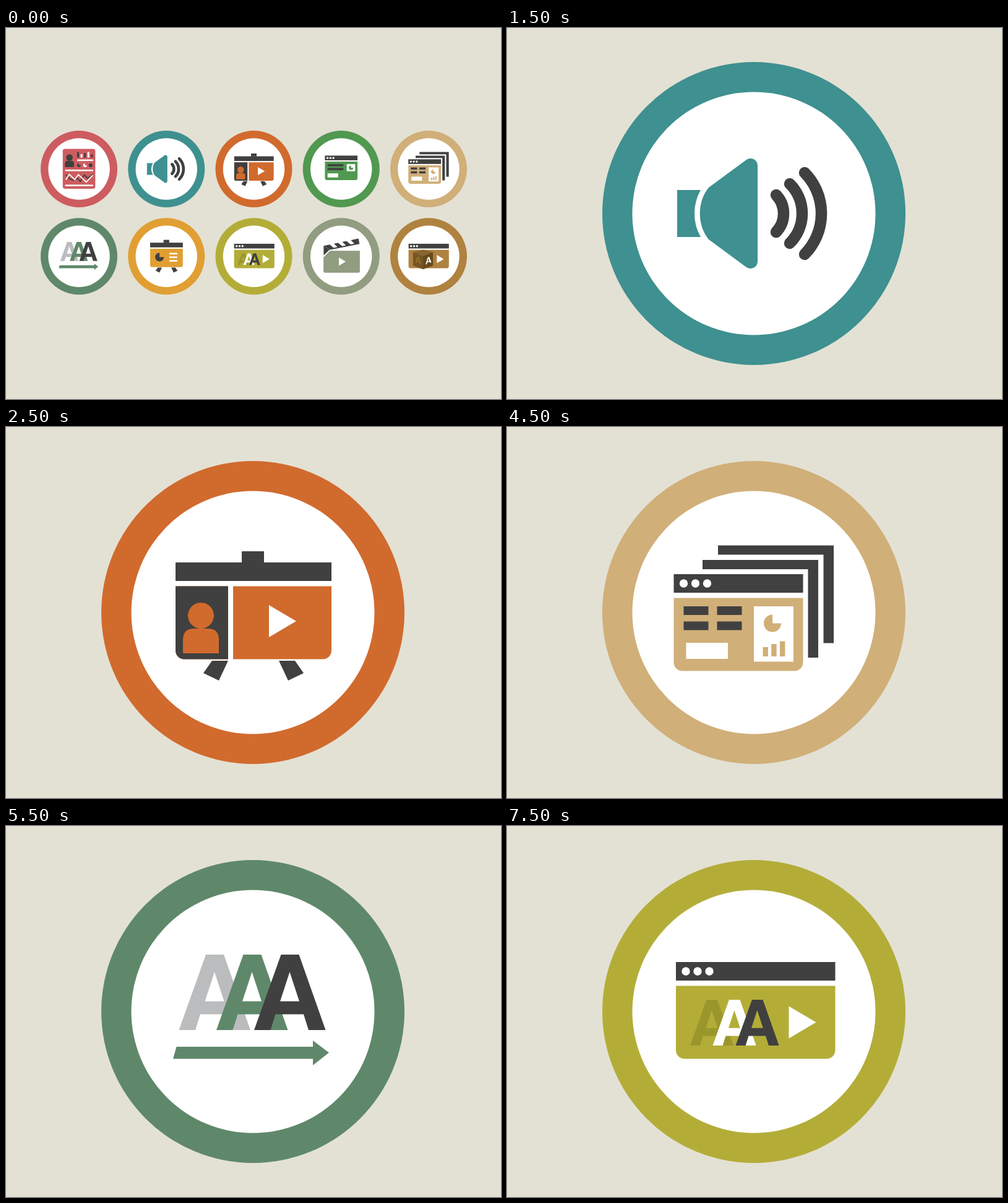
Recreate the animation shown at these times as an HTML page. Size 800 px wide and 600 px high, loop 8000 ms.

```html
<!DOCTYPE html>
<html lang="en">
<head>
<meta charset="utf-8">
<title>Icon set</title>
<style>
  html, body { margin: 0; width: 100%; height: 100%; overflow: hidden; background: #e3e1d4; }
  svg { display: block; }
</style>
</head>
<body>
<svg id="stage" width="800" height="600" viewBox="0 0 800 600"></svg>
<script>
const DARK = '#404040', WHITE = '#fff';

// Shapes without a fill inherit the icon's main colour.
const fillAttr = fill => fill ? ` fill="${fill}"` : '';
const path = (d, fill) => `<path d="${d}"${fillAttr(fill)}/>`;
const box = (x, y, w, h, fill) => `<rect x="${x}" y="${y}" width="${w}" height="${h}"${fillAttr(fill)}/>`;
const dot = (x, y, r, fill) => `<circle cx="${x}" cy="${y}" r="${r}"${fillAttr(fill)}/>`;
const line = (d, width, color, cap = 'butt') =>
  `<path d="${d}" fill="none" stroke="${color}" stroke-width="${width}" stroke-linecap="${cap}"/>`;

const pie = (x, y, r, fill) => path(`M${x} ${y}V${y - r}A${r} ${r} 0 1 0 ${x + r} ${y}Z`, fill);
const play = (x, y) => path(`M${x} ${y}l44 26l-44 26Z`, WHITE);
const person = (x, y, fill) => dot(x, y, 21, fill) +
  path(`M${x - 29} ${y + 61}v-22q0-18 18-18h22q18 0 18 18v22Z`, fill);
const letter = (x, y, scale, fill) =>
  `<path transform="translate(${x} ${y}) scale(${scale})" fill="${fill}" fill-rule="evenodd" d="${LETTER_A}"/>`;
const LETTER_A = 'M0 122L43.5 0H72.5L115.5 122H88L80 96.5H34.5L26.5 122ZM57.5 28L42 75.5H73Z';

const panel = (x, y, w) => box(x, y, w, 30, DARK) +
  path(`M${x} ${y + 38.5}h${w}v104a14 14 0 0 1-14 14h${28 - w}a14 14 0 0 1-14-14Z`);
const browser = (x, y, w) => panel(x, y, w) +
  [16, 35, 54].map(dx => dot(x + dx, y + 15, 6.7, WHITE)).join('');
const easel = (x, y, w, legs) => panel(x, y, w) + box(-18, y - 18, 36, 19, DARK) +
  path(`M${-legs} ${y + 159}h26l-15 32l-25-12ZM${legs + 2} ${y + 159}h-26l15 32l25-12Z`, DARK);

const frameEdge = (x, y) => path(`M${x} ${y}h187v158h-16.5v-143H${x}Z`, DARK);
const miniBars = [36, 22, 28, 36, 20].map((h, i) =>
  box(-12 + 22 * i, -73 - h, 12, h, i % 2 ? WHITE : DARK)).join('');

// Each icon: ring colour, horizontal centre when enlarged, artwork around (0, 0).
const icons = [
  ['#cd5c60', 400,
    '<rect x="-104" y="-128" width="208" height="254" rx="14"/>' +
    person(-61, -73, DARK) + miniBars + box(-12, -61, 103, 10, WHITE) +
    pie(0, -24, 12, DARK) + pie(38, -24, 12, WHITE) + dot(74, -24, 12, DARK) +
    box(-88, 4, 178, 10, WHITE) + box(-88, 100, 178, 10, WHITE) +
    line('M-84 38L-60 62L-36 72L-12 58L8 80L34 38L56 60L88 34', 7, DARK) +
    line('M-84 68L-62 34L-28 68L-4 36L46 84L88 40', 7, WHITE)],

  ['#3f9090', 399,
    path('M-124-38H-86A77 77 0 0 0-86 38H-124Z') +
    path('M-73-42L-12-87C-4-92 6-87 6-77V77C6 87-4 92-12 87L-73 42C-92 19-92-19-73-42Z') +
    line('M36-30A43.5 43.5 0 0 1 36 30M58-48A67.6 67.6 0 0 1 58 48M82-66A94 94 0 0 1 82 66',
      18.5, DARK, 'round')],

  ['#d16a2d', 399,
    easel(-125, -81, 252, 66) +
    path('M-125-42.5h85v118h-71a14 14 0 0 1-14-14Z', DARK) + box(-40, -43, 8, 120, WHITE) +
    person(-84, 5) + play(26, -12)],

  ['#519850', 400,
    browser(-104, -85.5, 208) +
    box(-87, -31, 101, 14, DARK) + box(-87, -6.5, 101, 14, DARK) +
    box(-87, 28, 67.5, 26, WHITE) + box(35.5, -31, 53.5, 45.5, WHITE) + pie(62.5, -8, 14)],

  ['#d0af79', 399,
    frameEdge(-58, -108.5) + frameEdge(-83, -85) + browser(-129.5, -62, 209) +
    [-113.5, -59.5].map(x => box(x, -10, 40, 14, DARK) + box(x, 14.5, 40, 14, DARK)).join('') +
    box(-109.5, 49, 67.5, 26, WHITE) + box(0, -10, 64, 89.5, WHITE) + pie(30, 17.5, 14) +
    [15, 20, 24.5].map((h, i) => box(14.5 + 13.7 * i, 71 - h, 8.5, h)).join('')],

  ['#5f886a', 399,
    letter(-119.5, -92, 1, '#bbbcbe') + letter(-59, -92, 1, '#5f886a') + letter(2, -92, 1, DARK) +
    path('M-123.5 57H97V47L123 66.5L97 87V76.5H-129Z')],

  ['#e19f33', 400,
    easel(-104, -87, 209, 55) + pie(-44, 5, 28, DARK) +
    [-22, 1, 24].map(y => box(19, y, 51, 10, WHITE)).join('')],

  ['#b3ad38', 399,
    browser(-126, -80, 257.5) +
    letter(-103, -19, 0.607, '#9b962c') + letter(-66.5, -19, 0.607, WHITE) +
    letter(-29.5, -19, 0.607, DARK) + play(56.5, -8.5)],

  ['#919c80', 400,
    path('M-113 6L-71-35H119V95a10 10 0 0 1-10 10H-103a10 10 0 0 1-10-10Z') +
    path('M-112-67L-74-42L-112-6Z', DARK) + path('M-112-67L110-113L117-79L-72-41Z', DARK) +
    [0, 1, 2].map(i => path(`M${-76 + 54 * i} ${-77 - 11 * i}l27-6l25 24l-24 5Z`, WHITE)).join('') +
    play(-15, 8)],

  ['#b08240', 400,
    browser(-128, -80, 257.5) +
    path('M-99-26L-36-42L28-26L-36-2Z', '#89662f') +
    path('M-99-26L-36-2V83L-99 59Z', '#755522') + path('M28-26L-36-2V83L28 59Z', '#664a1d') +
    `<g transform="matrix(1 .35 0 1 -86 -2)">${letter(0, 0, 0.33, '#94702f')}</g>` +
    `<g transform="matrix(1 -.35 0 1 -20 12)">${letter(0, 0, 0.33, WHITE)}</g>` +
    play(53, -8.5)],
];

const stage = document.getElementById('stage');
stage.innerHTML = icons.map(([color, , art]) =>
  `<g fill="${color}">${dot(0, 0, 245)}${dot(0, 0, 196.5, WHITE)}${art}</g>`).join('');
const groups = [...stage.children];

const LOOP = 8000, OVERVIEW = 500, HOLD = 1000;

function draw(time) {
  const t = time % LOOP;
  const active = Math.floor((t - OVERVIEW) / HOLD);
  groups.forEach((group, i) => {
    const overview = t < OVERVIEW;
    const place = overview
      ? `translate(${118 + 141.25 * (i % 5)} ${228 + 141.2 * Math.floor(i / 5)}) scale(.2531)`
      : `translate(${icons[i][1]} 300)`;
    group.setAttribute('transform', place);
    group.style.display = overview || i === active ? '' : 'none';
  });
}

const start = performance.now();
function tick() {
  draw(performance.now() - start);
  requestAnimationFrame(tick);
}
tick();
</script>
</body>
</html>
```
